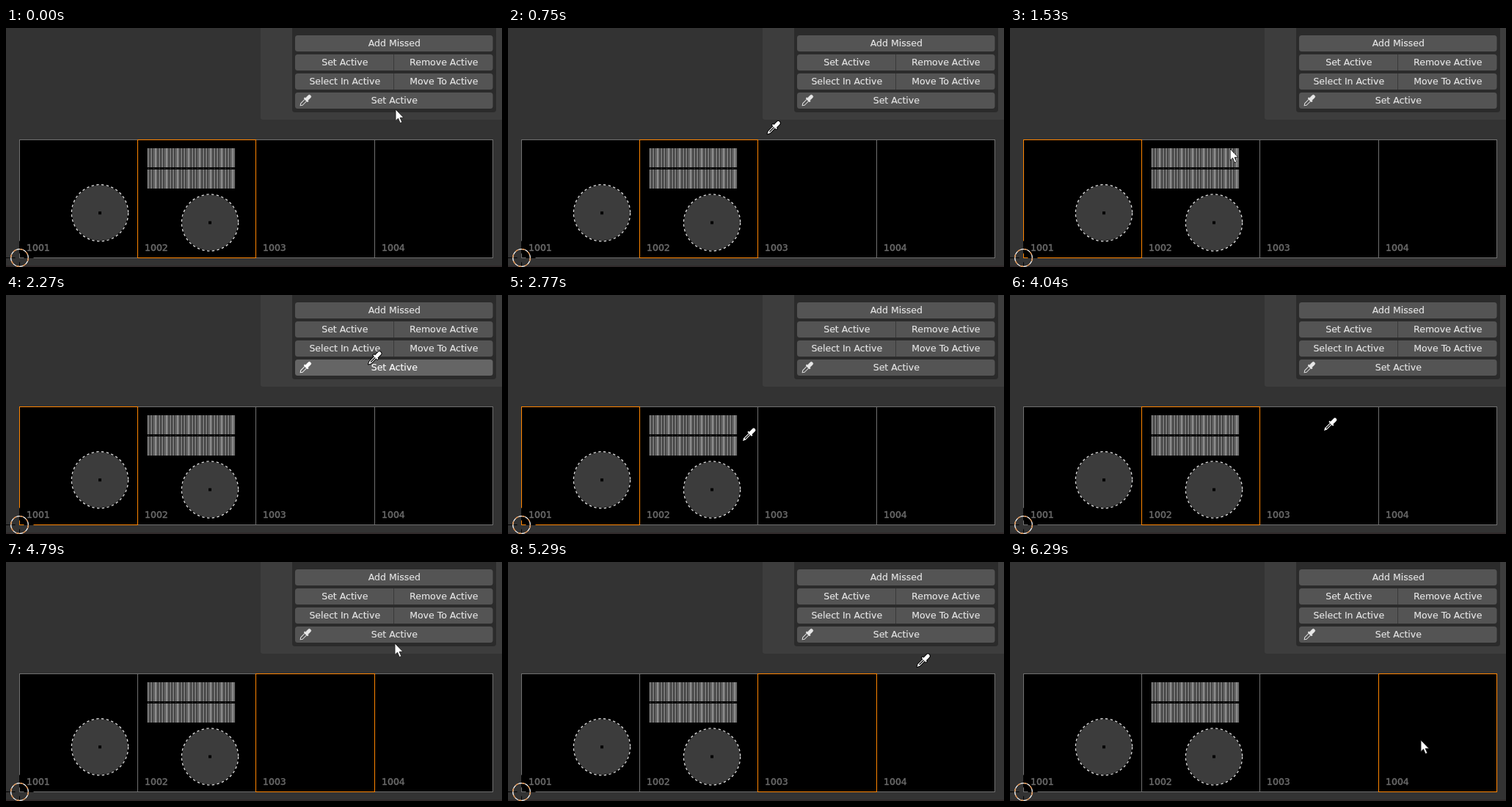
Recreate the animation shown at these times as an HTML page. Size 676 by 326 pixels, loop 6.54 s.

```html
<!DOCTYPE html>
<html lang="en">
<head>
<meta charset="utf-8">
<title>Tile picker</title>
<style>
  html, body { margin: 0; width: 100%; height: 100%; overflow: hidden; background: #333; }
  svg { display: block; }
  text { font: 12.5px "DejaVu Sans", sans-serif; fill: #e6e6e6; stroke: #e6e6e6; stroke-width: .15; }
  .button { fill: #545454; }
  .hover .button { fill: #656565; }
  .hover text { fill: #fff; stroke: #fff; }
  .icon { color: #e6e6e6; }
  .hover + .icon { color: #fff; }
  .tile { fill: none; stroke: #707070; shape-rendering: crispEdges; }
  .label { fill: #6e6e6e; stroke: #6e6e6e; stroke-width: .4; }
  .active { stroke: #ff8500; }
</style>
</head>
<body>
<svg id="stage" width="676" height="326" viewBox="0 0 676 326">
  <defs>
    <g id="dropperShape" transform="rotate(-45)" stroke-linejoin="round">
      <path d="M0 0L3.5 -1.7H13V1.7H3.5Z"/>
      <path d="M13 -4H15V-2.5H21Q23.5 -2.5 23.5 0T21 2.5H15V4H13Z"/>
    </g>
  </defs>

  <path fill="#3d3d3d" d="M347 0H676V125H350Q347 125 347 122Z"/>
  <path fill="#2b2b2b" d="M390 0H668V111Q668 115 664 115H394Q390 115 390 111Z"/>
  <g id="buttons"></g>
  <g id="picker"></g>
  <g class="icon" transform="translate(400.5 106.5) scale(.87)">
    <g transform="rotate(-45)" stroke="currentColor" stroke-linejoin="round">
      <path fill="none" stroke-width="1.1" d="M1 0L4 -2H13V2H4Z"/>
      <path fill="currentColor" stroke-width=".7" d="M13 -4H15V-2.6H21Q23.5 -2.6 23.5 0T21 2.6H15V4H13Z"/>
    </g>
  </g>

  <rect y="324" width="676" height="2" fill="#302a2b"/>
  <rect x="18" y="152" width="646" height="162"/>
  <g id="tiles"></g>
  <g id="strips"></g>
  <path d="M193 191.5H313" stroke="#3a3a3a" stroke-dasharray="2 5.5"/>
  <g id="discs"></g>
  <rect id="highlight" class="tile active" y="152.5" height="161"/>
  <g id="labels"></g>

  <g transform="translate(18.5 313.5)" fill="none">
    <path stroke="#000" d="M-19 0H-6M6 0H19M0 -23V-6M0 6V13"/>
    <circle r="11.8" stroke="#fff" stroke-width="1.3"/>
    <circle r="11.8" stroke="#d9863f" stroke-width="1.3" stroke-dasharray="4.63"/>
  </g>

  <path id="arrow" fill="#fff" stroke="#222" stroke-width=".9" stroke-linejoin="round"
        d="M0 0V15.5L3.5 12.3L6.2 18.6L8.8 17.5L6.1 11.4H11Z"/>
  <g id="dropper">
    <use href="#dropperShape" fill="#fff" stroke="#000" stroke-width="2"/>
    <use href="#dropperShape" fill="#fff"/>
    <path d="M3 -3L9 -9" stroke="#111" stroke-width="1.4"/>
  </g>
</svg>
<script>
const $ = id => document.getElementById(id);

function add(parent, tag, attrs, text = "") {
  const node = document.createElementNS("http://www.w3.org/2000/svg", tag);
  for (const key in attrs) node.setAttribute(key, attrs[key]);
  node.textContent = text;
  $(parent).append(node);
}

// One row holds a single button or two joined ones.
function addRow(parent, y, ...texts) {
  add(parent, "rect", { class: "button", x: 394, y, width: 269.5, height: 22, rx: 3.5 });
  if (texts.length > 1) add(parent, "rect", { x: 528, y, width: 1, height: 22, fill: "#3a3a3a" });
  const width = 270 / texts.length;
  texts.forEach((text, i) =>
    add(parent, "text", { x: 394.3 + width * (i + .5), y: y + 15, "text-anchor": "middle" }, text));
}

addRow("buttons", 10, "Add Missed");
addRow("buttons", 36, "Set Active", "Remove Active");
addRow("buttons", 62, "Select In Active", "Move To Active");
addRow("picker", 88, "Set Active");

const edges = [18.5, 179.5, 340.5, 502.5, 663.5];
const tileWidth = i => edges[i + 1] - edges[i];
for (let i = 0; i < 4; i++) {
  add("tiles", "rect", { class: "tile", x: edges[i], y: 152.5, width: tileWidth(i), height: 161 });
  add("labels", "text", { class: "label", x: edges[i] + 9.5, y: 304 }, 1001 + i);
}

for (let i = 0; i < 32; i++) {
  const x = Math.round(193 + i * 3.75);
  for (const y of [164, 193]) {
    add("strips", "rect", { x, y, width: 3, height: 26, fill: "#3c3c3c" });
    add("strips", "rect", { x, y, width: 1, height: 26, fill: "#b4b4b4" });
    add("strips", "rect", { x: x + 2, y, width: 1, height: 26, fill: "#808080" });
  }
}

for (const [cx, cy] of [[128, 252.3], [278, 265.5]]) {
  add("discs", "circle", { cx, cy, r: 38.5, fill: "#3c3c3c", stroke: "#000", "stroke-width": 1.3 });
  add("discs", "circle", { cx, cy, r: 38.6, fill: "none", stroke: "#e0e0e0",
    "stroke-width": 1.3, "stroke-dasharray": "3.4 3.4" });
  add("discs", "rect", { x: cx - 2, y: cy - 2, width: 4, height: 4 });
}

// pointer, x, y, active tile
const steps = [
  ["arrow", 531, 111, 1], ["arrow", 531, 100, 1], ["dropper", 500, 101, 1], ["dropper", 353.5, 144.5, 1],
  ["dropper", 150, 222, 1], ["arrow", 105, 222, 0], ["arrow", 300, 165, 0], ["arrow", 470, 118, 0],
  ["arrow", 494, 97, 0], ["dropper", 494, 94.5, 0], ["dropper", 400, 140, 0], ["dropper", 320, 199, 0],
  ["arrow", 325, 195, 1], ["arrow", 451, 111, 1], ["arrow", 455, 99, 1], ["dropper", 450, 125, 1],
  ["dropper", 428, 185, 1], ["dropper", 422, 222, 1], ["arrow", 430, 215, 2], ["arrow", 530, 111, 2],
  ["arrow", 535, 100, 2], ["dropper", 557.5, 143, 2], ["dropper", 560, 185, 2], ["dropper", 561, 235, 2],
  ["arrow", 561, 242, 3], ["arrow", 560, 243, 3],
];
const loop = 6540;
const startOf = i => i * 250 + (i > 3 ? 20 : 0) + (i > 11 ? 20 : 0);

function draw(time) {
  let i = steps.length - 1;
  while (startOf(i) > time) i--;
  const [pointer, x, y, tile] = steps[i];
  for (const id of ["arrow", "dropper"]) {
    $(id).setAttribute("visibility", id === pointer ? "visible" : "hidden");
  }
  $(pointer).setAttribute("transform", `translate(${x} ${y})`);
  $("picker").classList.toggle("hover", y >= 88 && y < 110);
  $("highlight").setAttribute("x", edges[tile]);
  $("highlight").setAttribute("width", tileWidth(tile));
}

const start = performance.now();
function tick() {
  draw((performance.now() - start) % loop);
  requestAnimationFrame(tick);
}
tick();
</script>
</body>
</html>
```
